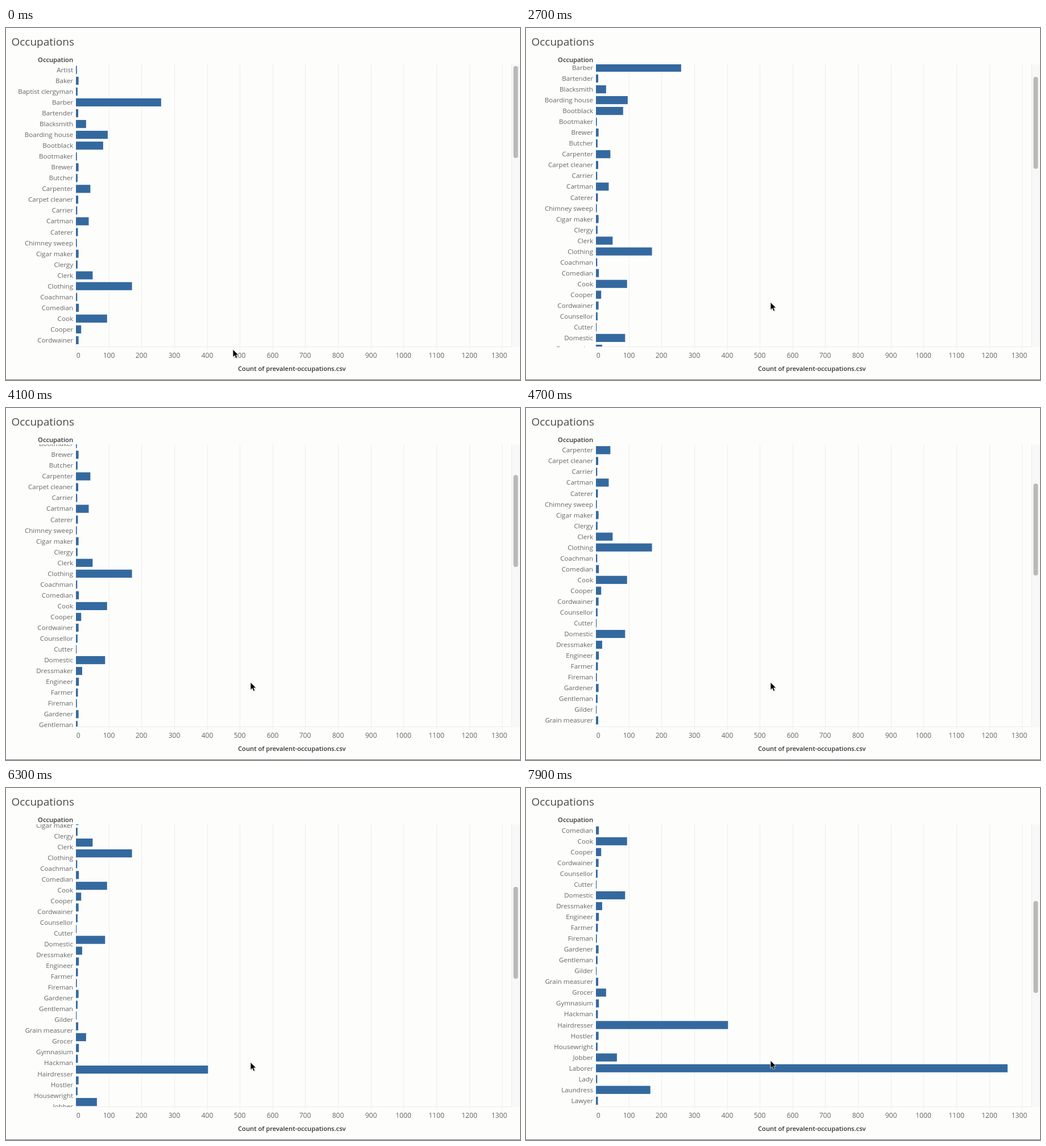
An HTML page for the animation above (8000 ms loop, 904 by 620 pixels).

```html
<!DOCTYPE html>
<html lang="en">
<head>
<meta charset="utf-8">
<title>Occupations</title>
<style>
  html, body { margin: 0; width: 100%; height: 100%; overflow: hidden; background: #fdfdfc; }
  svg { display: block; width: 904px; height: 620px; font-family: "Open Sans", "Noto Sans", sans-serif; }
  .title { font-size: 19px; fill: #484848; }
  .head { font-size: 11.2px; font-weight: 600; fill: #333; }
  .label { font-size: 11.6px; fill: #666; text-anchor: end; }
  .tick { font-size: 12.1px; fill: #666; text-anchor: middle; }
  .bar { fill: #34699f; }
</style>
</head>
<body>
<svg viewBox="0 0 904 620">
  <defs>
    <clipPath id="pane"><rect y="64" width="888" height="498"/></clipPath>
  </defs>
  <rect width="904" height="620" fill="#fdfdfc"/>
  <text class="title" x="9.5" y="31">Occupations</text>
  <text class="head" x="118" y="60" text-anchor="end">Occupation</text>
  <g id="grid"></g>
  <g clip-path="url(#pane)"><g id="labels"></g></g>
  <g clip-path="url(#pane)"><g id="bars"></g></g>
  <path d="M123 561.5H889" stroke="#ececec"/>
  <rect x="889" y="64" width="15" height="498" fill="#f8f8f8"/>
  <path d="M889.5 64V562" stroke="#ebebeb"/>
  <rect id="thumb" x="892.5" y="67" width="8" height="162" rx="4" fill="#b9b9b9"/>
  <text class="head" x="502.8" y="604" text-anchor="middle">Count of prevalent-occupations.csv</text>
  <path d="M0 619.5H904" stroke="#777"/>
  <g id="cursor">
    <path d="M1 2V15L4 12.2L6.2 17L8.8 15.8L6.7 11.2H10.8Z" opacity=".16"/>
    <path d="M0 0V13.6L3.1 10.8L5.3 15.6L7.7 14.5L5.6 9.9H9.8Z" stroke="#fff" stroke-width=".8"/>
  </g>
</svg>
<script>
const LOOP = 8000, STEP = 100, PITCH = 19.04, TOP = 73.8, LEFT = 123, UNIT = .5764;
const $ = id => document.getElementById(id);

const names = `Artist,Baker,Baptist clergyman,Barber,Bartender,Blacksmith,Boarding house,Bootblack,
Bootmaker,Brewer,Butcher,Carpenter,Carpet cleaner,Carrier,Cartman,Caterer,Chimney sweep,Cigar maker,
Clergy,Clerk,Clothing,Coachman,Comedian,Cook,Cooper,Cordwainer,Counsellor,Cutter,Domestic,Dressmaker,
Engineer,Farmer,Fireman,Gardener,Gentleman,Gilder,Grain measurer,Grocer,Gymnasium,Hackman,Hairdresser,
Hostler,Housewright,Jobber,Laborer,Lady,Laundress,Lawyer`.split(",").map(s => s.trim());

// Common trades; the remaining ones are all rare
const common = {
  Barber: 260, Blacksmith: 31, "Boarding house": 97, Bootblack: 83, Carpenter: 44, Cartman: 39,
  Clerk: 51, Clothing: 171, Cook: 95, Cooper: 16, Domestic: 89, Dressmaker: 19, Grocer: 31,
  Hairdresser: 403, Jobber: 64, Laborer: 1256, Laundress: 166
};
const rare = i => 2 + (i * 5 + 1) % 8;

const lerp = (a, b, k) => a + (b - a) * k;
const ramp = (t, from, to) => Math.min(1, Math.max(0, (t - from) / (to - from)));
const smooth = k => k * k * (3 - 2 * k);

function add(parent, tag, attrs, text = "") {
  const el = document.createElementNS("http://www.w3.org/2000/svg", tag);
  for (const k in attrs) el.setAttribute(k, attrs[k]);
  el.textContent = text;
  $(parent).appendChild(el);
}

for (let n = 0; n <= 1300; n += 100) {
  const x = Math.round(LEFT + n * UNIT);
  add("grid", "path", { d: `M${x + .5} 64V567`, stroke: "#eee" });
  // The outer numbers are kept inside the axis
  const tx = Math.min(867.5, Math.max(127.3, x));
  add("grid", "text", { class: "tick", x: tx, y: 581 }, n);
}

names.forEach((name, i) => {
  const y = TOP + i * PITCH;
  add("labels", "text", { class: "label", x: 118, y: y + 4.1 }, name);
  add("bars", "rect", { class: "bar", x: LEFT, y: y - 7, width: (common[name] || rare(i)) * UNIT, height: 14.2 });
});

// A steady wheel scroll that slowly speeds up, then stops
function scrollAt(t) {
  const s = Math.max(0, t - 1800) / 1000;
  return Math.min(418, 66 * s + 2.1 * s * s);
}

function move(id, x, y) {
  $(id).setAttribute("transform", `translate(${x} ${y})`);
}

function draw(ms) {
  const t = Math.floor(ms % LOOP / STEP) * STEP;
  const scroll = scrollAt(t);
  // Labels are now and then repainted a moment late
  const late = t % 700 === 0 ? 85 : 0;
  const glide = smooth(ramp(t, 400, 1200));
  move("bars", 0, -scroll);
  move("labels", 0, -Math.round(scrollAt(t - late)));
  move("thumb", 0, Math.round(scroll * .316));
  move("cursor", lerp(399, 430, glide), lerp(566, 483, glide) - 3 * ramp(t, 7600, 7800));
}

const start = performance.now();
function frame() {
  draw(performance.now() - start);
  requestAnimationFrame(frame);
}
frame();
</script>
</body>
</html>
```
